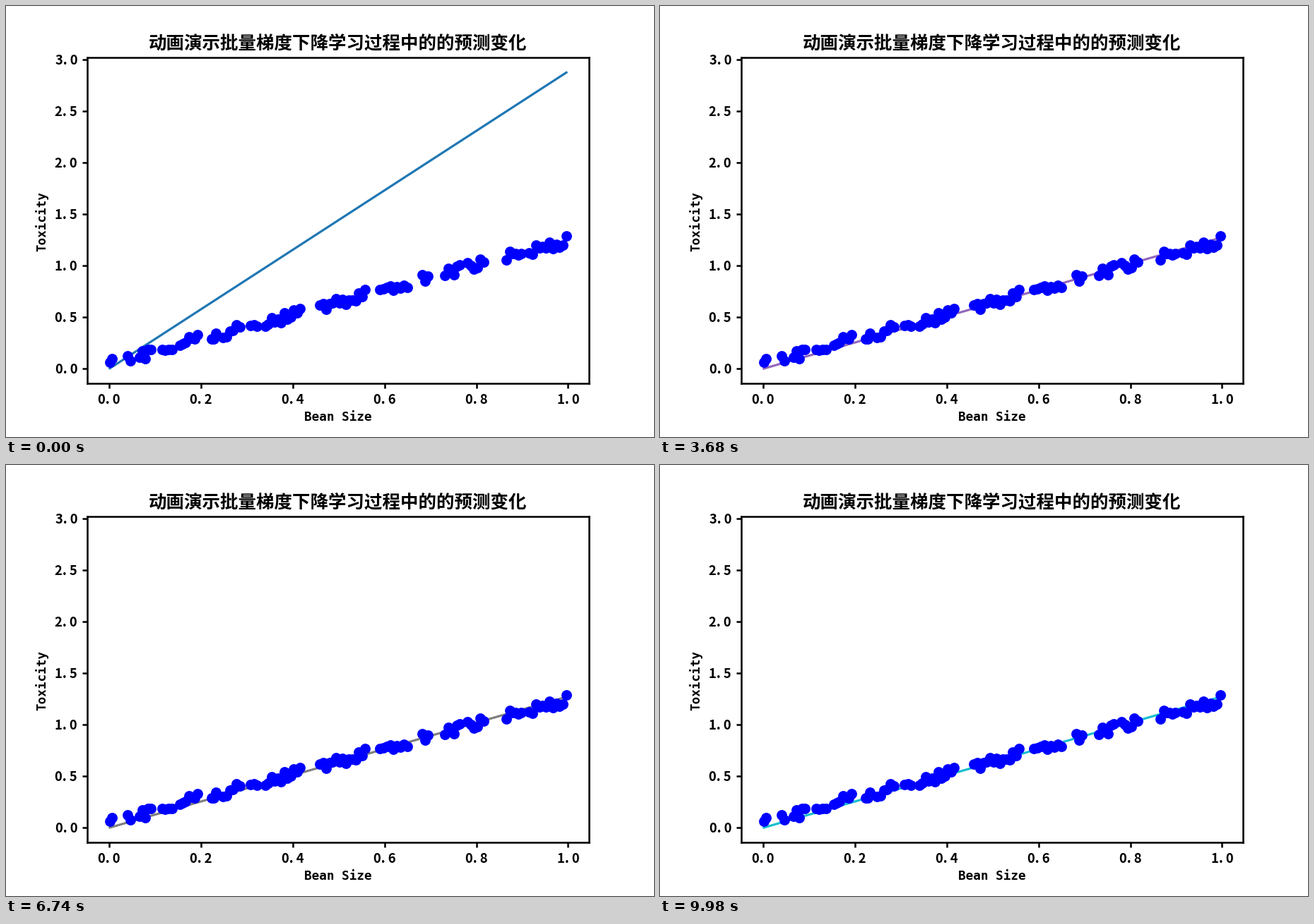
A matplotlib script for the animation above (10 s loop, 917x611 px).

```python
import math
import numpy as np
import matplotlib.pyplot as plt
from matplotlib.animation import FuncAnimation

W, H, DPI = 917, 611, 917 / 6
FRAMES, INTERVAL = 500, 20
CJK, MONO = "Noto Sans CJK JP", "DejaVu Sans Mono"

# Gradient descent on the mean squared error of y = w * x
START, BEST = 3.0, 1.275
RATE, MEAN_SQUARE = 0.1, 0.328

# Beans fill these stretches of the x axis at a steady spacing
STRETCHES = [
    (0.0014, 0.006), (0.040, 0.046), (0.066, 0.091), (0.115, 0.137),
    (0.154, 0.193), (0.224, 0.233), (0.248, 0.285), (0.308, 0.322),
    (0.340, 0.416), (0.459, 0.558), (0.590, 0.649), (0.682, 0.695),
    (0.732, 0.764), (0.781, 0.816), (0.866, 0.898), (0.915, 0.9962),
]
SPACING = 0.0075


def make_beans():
    """Sizes along the stretches, toxicity 1.2 x plus uniform noise."""
    xs = np.concatenate([np.linspace(a, b, math.ceil((b - a) / SPACING) + 1)
                         for a, b in STRETCHES])
    noise = np.random.default_rng(7).random(len(xs))
    return xs, 1.2 * xs + 0.1 * noise


def weight(step):
    """Weight after the given number of descent steps."""
    return BEST + (START - BEST) * (1 - 2 * RATE * MEAN_SQUARE) ** step


def padded(lo, hi):
    pad = 0.05 * (hi - lo)
    return lo - pad, hi + pad


def tick_text(value):
    return f"{value:.1f}".replace(".", ". ")


def label(x, y, text, size, font, **kw):
    """Bold text with its baseline at a stage pixel."""
    kw = {"ha": "center", "va": "baseline", **kw}
    fig.text(x / W, 1 - y / H, text, fontsize=size, family=font,
             weight="bold", color="black", **kw)


# The small excess keeps the pixel size from being truncated
fig = plt.figure(figsize=((W + 0.001) / DPI, (H + 0.001) / DPI), dpi=DPI,
                 facecolor="white")
ax = fig.add_axes([0.125, 0.125, 0.775, 0.755])

xs, ys = make_beans()
ends = xs[[0, -1]]
ax.set_xlim(padded(*ends))
ax.set_ylim(padded(*(weight(1) * ends)))

x_ticks = np.arange(6) * 0.2
y_ticks = np.arange(7) * 0.5
ax.set_xticks(x_ticks, labels=[])
ax.set_yticks(y_ticks, labels=[])
ax.tick_params(width=1.2)
for spine in ax.spines.values():
    spine.set_linewidth(1.2)

for v in x_ticks:
    px = ax.transData.transform((v, 0))[0]
    label(px, 564, tick_text(v), 8.7, CJK)
for v in y_ticks:
    py = H - ax.transData.transform((0, v))[1]
    label(101, py + 7, tick_text(v), 8.7, CJK, ha="right")

label(470, 60.5, "动画演示批量梯度下降学习过程中的的预测变化", 12, CJK)
label(469.5, 588, "Bean Size", 8.3, MONO)
label(56, 305, "Toxicity", 8.3, MONO, rotation=90, rotation_mode="anchor")

line, = ax.plot(ends, weight(1) * ends, lw=1.5, zorder=2)
ax.plot(xs, ys, "o", color="#0000ff", ms=6, zorder=3)


def update(i):
    line.set_ydata(weight(i + 1) * ends)
    line.set_color(f"C{i % 10}")
    return line,


anim = FuncAnimation(fig, update, frames=FRAMES, interval=INTERVAL,
                     init_func=lambda: update(0), repeat=True, repeat_delay=0)
plt.show()
```
